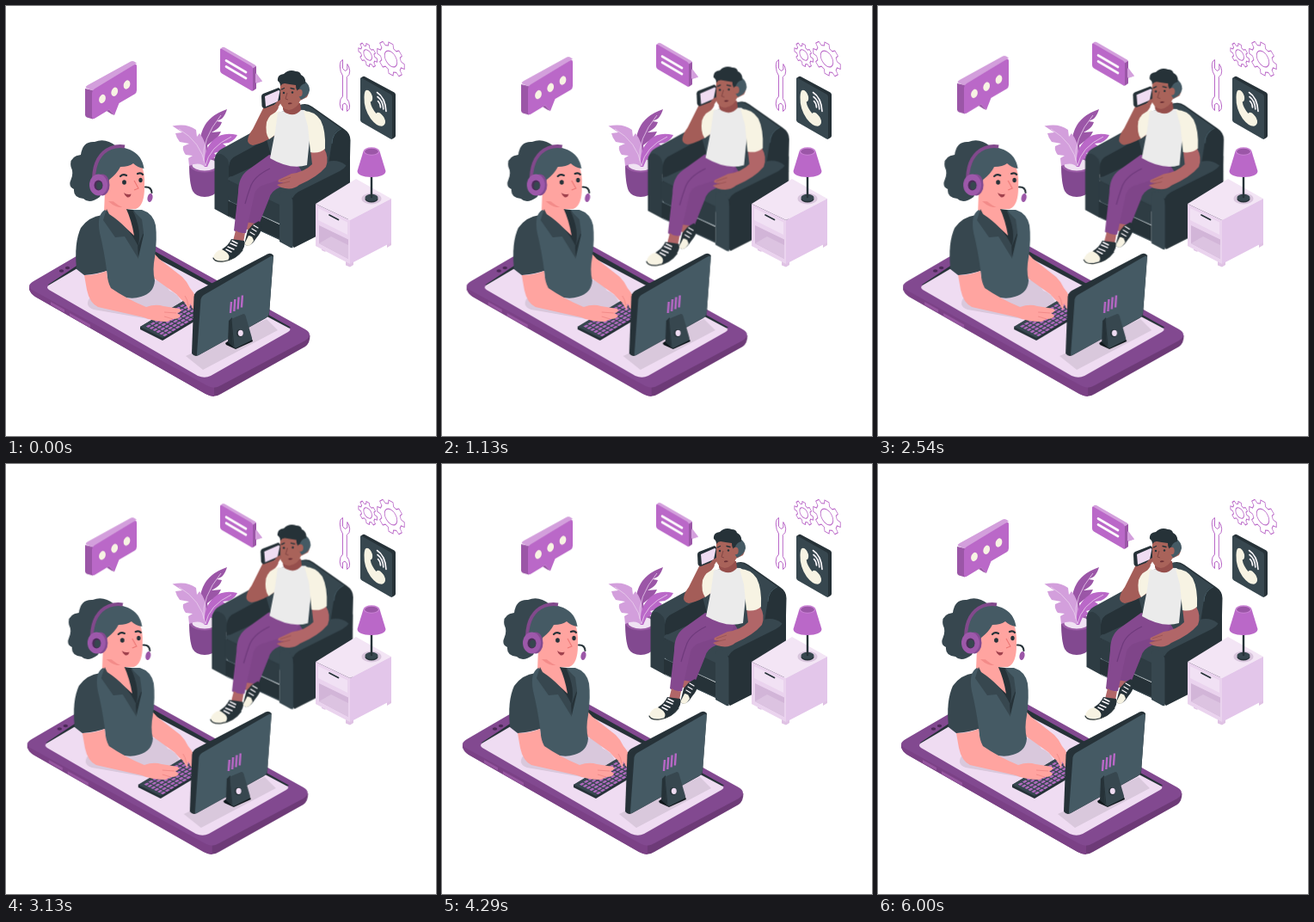
These frames come from a looping animation (500x500 px, 6040 ms). An HTML page:

```html
<!DOCTYPE html>
<html lang="en">
<head>
<meta charset="utf-8">
<title>Customer support</title>
<style>
html, body { margin: 0; width: 100%; height: 100%; overflow: hidden; background: #fff; }
svg { display: block; width: 100vw; height: 100vh; }
.float { animation: float 1.5s linear infinite; }
.shake { animation: shake 6s linear infinite; }
.beat { animation: beat 1s linear infinite; transform-origin: 321.5px 186.5px; }
@keyframes float { 50% { transform: translateY(-10px); } }
@keyframes shake {
  10%, 90% { transform: translateX(-1px); }
  20%, 80% { transform: translateX(2px); }
  30%, 50%, 70% { transform: translateX(-4px); }
  40%, 60% { transform: translateX(4px); }
}
@keyframes beat {
  0%, 15%, 40%, 55%, 100% { transform: scale(1); }
  10%, 50% { transform: scale(1.1); }
}
.p { fill: #ba68c8; } .pl { fill: #d39fdc; } .pd { fill: #824990; } .pm { fill: #9b56a7; }
.k { fill: #263238; } .d { fill: #37474f; } .g { fill: #455a64; } .kd { fill: #2e3c43; }
.s { fill: #ffa4a0; } .b { fill: #b16668; } .c { fill: #f7f3e3; }
.line { fill: none; stroke: #ba68c8; stroke-width: 1; stroke-linejoin: round; }
.ink { fill: none; stroke: #263238; stroke-linecap: round; }
.cream { fill: none; stroke: #fcf8fc; stroke-linecap: round; }
</style>
</head>
<body>
<svg viewBox="0 0 500 500">
  <!-- gears and wrench -->
  <g class="line">
    <path id="gearS" transform="matrix(.866 .5 0 1 420.700 57)"/>
    <path id="gearL" transform="matrix(.866 .5 0 1 447.500 61.500)"/>
    <path d="M391.500 81 V105 Q388 108 388.200 114 Q388.500 119 391.500 121.500 V114.500 L394 113 L396.500 116 V122.500 Q400 121 399.600 116 Q399.300 111 396.300 107.500 V82.500 Q400 80.500 399.700 75.500 Q399.300 70.500 396.800 67.500 V74 L394.200 75.500 L391.500 72.500 V62.500 Q388.200 64 388.300 70 Q388.500 77 391.500 81Z"/>
  </g>

  <!-- call sign -->
  <path class="k" d="M412 84 L415 82 Q416.500 81.500 418 82.500 L451.500 100.500 Q453 101.500 453 103 V151 Q453 152.500 451.500 153.200 L448.500 155Z"/>
  <path class="d" d="M412 85 Q412 83 414 84 L447 102.500 Q449 103.700 449 105.500 V153.500 Q449 155.500 447 154.400 L414 135.500 Q412 134.300 412 132.500Z"/>
  <path class="c" d="M418 98.500 Q420.500 96.500 423.500 100 Q426.800 104.500 426 109 Q425.500 111 423.700 111.500 Q424.500 118 430.500 125 Q432 122.800 435 124.500 Q439.500 128 441 133.500 Q441.500 138.500 437 139.800 Q431 140 424 131 Q416 119.500 416.500 106 Q416.600 100.500 418 98.500Z"/>
  <g class="cream" stroke-width="1.600"><path d="M432.500 110.500 Q435.500 113.500 435.500 118"/><path d="M432 105.500 Q438.300 110 438.800 120"/><path d="M431.500 100.500 Q441 106.500 442 122.500"/></g>

  <!-- plant -->
  <path class="pd" d="M213 183 Q213 206 217 215 Q221 222 231 222 Q241 222 246 215 Q250 204 249 183Z"/>
  <ellipse cx="231" cy="184" rx="18" ry="9.500" fill="#9b5ca6"/>
  <ellipse cx="231" cy="184.500" rx="14.500" ry="7" fill="#f0e2f3"/>
  <path class="pm" d="M229 184 Q221 162 229 143 Q236 127 257 120 Q255 127 251 131 L245 134 L251 135 Q249 141 244 144 L239 147 L250 146 Q246 155 239 158 L234 162 Q237 172 232 184Z"/>
  <path class="pl" d="M231 187 Q227 182 218 184 L213 186 L212 177 L217 174 L209 173 Q205 168 206 163 L213 160 L202 158 Q198 153 197 148 L205 147 L193.500 139.500 Q211 136 221 144 L222 152 L225 148 Q233 158 233 170 L234 187Z"/>
  <path class="p" d="M231 187 Q229 167 242 155 Q252 146 269 150 Q266 156 259 159 L252 160 L256 163 Q251 169 246 170 L242 171 L245 174 Q240 178 238 178 L234 187Z"/>
  <path d="M230 180 Q227 155 250 127 M232 186 Q227 158 201 143 M232 186 Q236 164 262 152" fill="none" stroke="#ead0ee" stroke-width=".8"/>

  <!-- armchair and caller -->
  <g class="beat">
    <path class="k" d="M310 140 L343 115 Q349 112 356 117 L393 143 Q400.500 148 400.500 156 L399 215 L330 240Z"/>
    <path class="d" d="M306 142 L318 124 L340 115 Q347 113 354 117.500 L389 142 Q380 147 379 158 L374 190 L320 212 L285 200Z"/>
    <path d="M379 160 Q379 148 390 142.500" fill="none" stroke="#455a64" stroke-width="1"/>
    <path class="d" d="M242.500 180 Q243 170 251 166 L293 143 Q302 142 306 148 L308 178 L262 198Z"/>
    <path class="kd" d="M242.500 180 Q243 171 250 172 Q260 176 259 187 V245 L242.500 236Z"/>
    <path class="k" d="M259 187 Q260 177 268 174 L303 155 L310 180 L259 212Z"/>
    <path class="kd" d="M257 205 L305 180 L338 196 L318 238 L262 211Z"/>
    <path class="d" d="M258 202 Q258 198 263 198 L300 181 L330 196 L318 231Z"/>
    <path class="kd" d="M258 203 L318 232 V253 L262 228 Q258 226 258 221Z"/>
    <path class="k" d="M258 226 L318 254 V272 L258 244Z"/>
    <path d="M259 245 L318 271 M258 226 L318 253" stroke="#455a64" stroke-width=".6"/>
    <path class="d" d="M318 220 Q319 212 327 207 L374 181 Q386 178 395 185 L400 192 L338 224Z"/>
    <path class="k" d="M332 230 Q332 221 340 216 L388 192 Q399 186 400 174 V244 Q399 248 394 251 L335 281 L329 275Z"/>
    <path class="d" d="M318 222 Q319 214 325 215 Q334 219 333.500 231 V281 Q332 282 329 280 L318 274Z"/>
    <!-- legs -->
    <path d="M340 186 L347 197 Q333 207 318 211 Q308 215 306 224 L294 254 L277 252 L286 215 Q289 201 307 193Z" fill="#7f4589"/>
    <path class="b" d="M278 251 l12 2 l-4 9 l-8 -3z"/>
    <path class="k" d="M277 277 L281 261 L287 254 L294 250 Q297 253 297 258 Q297 263 291 270 Q286 278 281 279Z"/>
    <path class="c" d="M277 277 L282 267 Q287 267 288 273 Q284 279 281 279Z"/>
    <path class="cream" d="M286 259 l5 3 M284 263 l5 3 M288 255 l5 3" stroke-width="1.200"/>
    <path d="M306 173 L339 186 Q341 193 331 198 L297 209 Q289 213 288 223 L279 264 Q271 266 265 261 L270 217 Q270 199 281 191Z" fill="#85498f"/>
    <path d="M307 189 Q288 198 284 211 Q281 219 278 230" fill="none" stroke="#6f3a7c" stroke-width="1.200"/>
    <path class="b" d="M267 261 Q272 265 278 264 L276 275 L264 273Z"/>
    <path class="c" d="M241 292 Q243 285 251 283 L276 282 Q269 295 254 298 Q244 299 241 295Z"/>
    <path class="k" d="M251 283 Q259 278 262 271 Q269 272 277 273 Q279 280 273 286 Q267 294 258 295.500 Q263 289 251 283Z"/>
    <path class="ink" d="M241 293 Q243 298 253 297 Q267 295 275 284" stroke-width="1.200"/>
    <path class="cream" d="M258 280 l7 3 M261 276 l7 3 M256 283 l6 3 M263 273 l6 3" stroke-width="1.500"/>
    <!-- upper body -->
    <path d="M281 157 Q281 151 287 143 L299 119 Q302 111 310 113 L317 118 Q314 125 307 128 L303 144 L316 136 L315 149 Q299 160 287 162 Q282 161 281 157Z" fill="#a45d58"/>
    <path class="c" d="M303 135 Q306 125 318 122 L322 143 L306 155 Q301 148 303 135Z"/>
    <path fill="#ebebeb" d="M316 124 Q328 120 347 121 Q354 124 355 139 L352 165 L350 185 Q331 191 307 177 L313 146Z"/>
    <path d="M322 113 H342 L343 121 Q336 129 327 125 Q323 124 322 120Z" fill="#964f4c"/>
    <path class="b" d="M354 167 L370 166 Q376 176 372 187 Q362 199 341 208 Q333 215 320 211 L315 208 L324 205 Q314 206 317 202 L332 195 Q347 193 356 184Z"/>
    <path d="M318 207 L330 204 M319 203 L331 199" stroke="#964f50" stroke-width=".7"/>
    <path class="c" d="M346 122 Q359 122 366 133 Q372 145 371 166 Q364 172 354 170 L351 140Z"/>
    <!-- head -->
    <path d="M319 92 Q321 87 333 87 L350 92 Q354 99 350 106 L342 110 Q339 119 329 121 Q320 120 318 110Z" fill="#a9635a"/>
    <path class="g" d="M338 93 L347 87 Q353 91 353 98 Q352 105 343 109 Q339 104 338 93Z"/>
    <path class="k" d="M319 93 Q319 89 316 87 Q315 80 323 79 Q329 73 337 76 Q342 76 343 80 Q349 83 348 90 Q342 91 340 99 Q337 98 337 92 Q329 91 324 90 Q321 90 319 93Z"/>
    <ellipse cx="341.500" cy="101" rx="3.200" ry="4.200" fill="#a9635a"/>
    <circle class="k" cx="323" cy="101" r="1.200"/><circle class="k" cx="333" cy="100.500" r="1.200"/>
    <path class="ink" d="M320.500 97 l3 -1.500 M331 95.500 l4 1" stroke-width="1.300"/>
    <path d="M327 101 L325 108 L328 109" fill="none" stroke="#7e4342" stroke-width=".9"/>
    <path d="M328 113 Q330 111.500 333 113 Q331 115 328 114Z" fill="#6c3036"/>
    <path class="k" d="M297 105 Q297 103 299 102 L317 95 L319 97 V112 L301 119 Q298 119 297.500 116Z"/>
    <path fill="#efdcf2" d="M301 105 L317 98 Q319 98 318 101 L316 111 L302 117Z"/>
    <path d="M311 119 Q313 111 319 109 L320 112 L315 120Z" fill="#a45d58"/>
  </g>

  <!-- side table and lamp -->
  <path fill="#dfc2e4" d="M367 280 h4.500 v6 l-4.500 -2z M395 296 h5 v7.500 l-5 -2z M443 275 h5 v3 l-5 3z M400 298 l4 -2 v5 l-4 2.500z"/>
  <path fill="#f3e5f5" d="M360 230 L407 201 L448 224 L400 249Z"/>
  <path fill="#ead3ee" d="M360 230 L400 249 V300 L360 279Z"/>
  <path fill="#e3c6ea" d="M400 249 L448 224 V275 L400 300Z"/>
  <path fill="#f1e1f4" d="M363 235 L397 251.500 V266 L363 249Z"/>
  <path fill="#d2b5d8" d="M364 255 L398 271.500 V294 L364 276Z"/>
  <path fill="#dcc3e1" d="M364 276 L378 268 L398 278 V294Z"/>
  <path class="ink" d="M376 243 L386.500 248.500" stroke-width="1.700"/>
  <ellipse cx="425" cy="224" rx="11.500" ry="6.500" fill="#d9c6dd"/>
  <ellipse class="k" cx="425" cy="224.500" rx="7.500" ry="4"/>
  <ellipse class="d" cx="425" cy="222.800" rx="7.500" ry="4"/>
  <path class="ink" d="M425 195 V222" stroke-width="2.400"/>
  <path class="p" d="M415.500 169 L408.500 192 Q409 198.500 425 199 Q441 198.500 441.500 192 L434.500 169Z"/>
  <ellipse cx="425" cy="169" rx="9.500" ry="4.700" fill="#ca83d5"/>
  <ellipse class="pm" cx="425" cy="169.300" rx="7.800" ry="3.500"/>

  <!-- speech bubbles -->
  <g class="float">
    <path class="pm" d="M92 96 L101 98 V131.500 L94 129.500 Q92 128.500 92 126.500Z"/>
    <path class="pl" d="M92.500 95 Q93 93 95 92 L145 64.500 Q147 63.500 149 64.500 L152 66.500 L101 98.500Z"/>
    <path class="p" d="M100 101 Q100 98 103 96.300 L148.500 68.500 Q152 66.300 152 70 V98 Q152 101 149.500 102.500 L131.500 113 L126 127 L120 120.500 L103.500 130.500 Q100 132.500 100 129Z"/>
    <path class="pm" d="M117 122 L120 120.500 L126 127 L122.500 125.500Z"/>
    <g class="c"><ellipse cx="112" cy="108" rx="3.700" ry="5.300" transform="rotate(18 112 108)"/><ellipse cx="126.200" cy="99.800" rx="3.700" ry="5.300" transform="rotate(18 126.200 99.800)"/><ellipse cx="140.500" cy="91.500" rx="3.700" ry="5.300" transform="rotate(18 140.500 91.500)"/></g>
  </g>
  <g class="float">
    <path class="pl" d="M249 50 L251.500 48 Q253 47.500 254.500 48.300 L290 68.700 Q291 69.500 291 71 V78 L298 87.500 L291 90 V96 L286 99Z"/>
    <path class="pm" d="M286 73 L291 70 V96 L287.500 98.500 L286 98Z"/>
    <path class="pl" d="M290 78 L298 87.500 L290 89.500Z"/>
    <path class="p" d="M249 51 Q249 49 251 50 L285 69.700 Q287 71 287 73 V97 Q287 99.500 285 98.300 L251 78.500 Q249 77.300 249 75Z"/>
    <g class="cream" stroke-width="2.700"><path d="M256 63.500 L279 77"/><path d="M256 70.500 L279 84"/></g>
  </g>

  <!-- operator on the phone -->
  <g class="shake">
    <path fill="#6d3a77" d="M27 326 V329 Q28 334 34 338 L232 451 Q242 456.500 250 451 L348 396 Q353.500 392 353.500 383Z"/>
    <path fill="#7b4186" d="M27 326 V329 Q28 334 34 338 L232 451 Q238 454 242 454 V441Z"/>
    <path class="pd" d="M32 320 L128 264 Q137 260 146 264 L348 376 Q358 382 348 389 L250 441 Q242 446 234 441.500 L32 331 Q22 326 32 320Z"/>
    <path d="M52 344 l16 9 v3.500 l-16 -9z M74 357 l24 13.500 v3.500 l-24 -13.500z" fill="#95559f"/>
    <path class="k" d="M49 324 L132 269 Q138 266 144 269 L331 373.500 L322 379 L140 281 L52 328Z"/>
    <path fill="#efdcf2" d="M50 324.500 L132 276 Q137 273 142 275.500 L328 374 Q333 376 328 379 L238 430 Q231 433.500 223 430 L50 330 Q46 327 50 324.500Z"/>
    <path class="k" d="M84 294 l8 -4.500 q3 0 3 3 l-8 5 q-4 -.5 -3 -3.500z"/>
    <ellipse cx="64.500" cy="308" rx="2.700" ry="1.700" fill="#4c2a58"/><ellipse cx="71.500" cy="304.500" rx="2.700" ry="1.700" fill="#4c2a58"/>
    <!-- shadows -->
    <path fill="#d9c8dc" d="M97 340 Q91 349 102 353 L166 364 L205 348 Q201 334 190 331 Q186 323 178 318 L120 328Z"/>
    <path fill="#d9c8dc" d="M209 407 L229 423 L316 377 L303 364Z"/>
    <!-- keyboard -->
    <path class="k" d="M156 373 L228 330 L252 343 V347 L182 389 L156 376Z"/>
    <path class="d" d="M156 373 L228 330 L252 343 L182 386Z"/>
    <g stroke="#b06abf" stroke-width="2.900" stroke-dasharray="4.300 1.400" transform="matrix(.86 -.52 .86 .46 158 373)">
      <path d="M3 4 H78 M3 8.500 H78 M3 13 H78 M3 17.500 H78 M3 22 H78 M3 26.300 H78"/>
    </g>
    <!-- right arm -->
    <path class="s" d="M167 282 L178 294 L205 315 Q211 321 214 328 Q222 337 221 346 L218 353 L214 346 L213 354 L208 345 Q203 341 198 335 L170 315Z"/>
    <path d="M208 337 Q211 341 212 348" fill="none" stroke="#ee8583" stroke-width=".8"/>
    <!-- hair bun -->
    <path class="d" d="M128 163 Q116 153 103 158 Q89 157 87 173 Q73 175 75.500 187 Q79 194 75.500 202 Q72 210 79 213 Q78 223 90 224 Q97 231 109 222 L122 195Z"/>
    <!-- neck and jacket -->
    <path class="s" d="M115 215 L140 224 Q138 234 145 243 Q153 255 155 270 L135 262 L114 240Z"/>
    <path d="M119 227 Q127 235 139 235 L139 228Z" fill="#f38b89"/>
    <path class="d" d="M112 243 Q96 245 87 258 Q79 275 82 306 L91 313 Q106 312 120 307 L126 270Z"/>
    <path class="g" d="M115 237 Q105 243 109 264 Q114 284 117 307 L119 329 Q139 344 157 338 Q172 334 173 319 Q170 307 173 292 Q176 271 174 255 Q171 241 158 237 L147 237 L152 262 L126 247Z"/>
    <path class="k" d="M139 236 L148 237 Q157 251 160 266 L154 292 Q147 272 137 250Z"/>
    <path class="s" d="M117 234 L139 234 Q146 249 149 267 Q135 253 117 242Z"/>
    <path class="d" d="M117 236 L113 249 L127 269 L138 268 L154 294 L153 278 Q143 257 120 242Z"/>
    <path class="d" d="M147 237 L158 248 L160 263 L153 281 Q159 262 147 237Z"/>
    <!-- left arm -->
    <path class="s" d="M91 313 Q106 313 117 308 Q118 321 122 328 Q141 341 163 350 Q174 346 183 349 L202 352 Q206 355 199 357 L203 360 Q202 364 194 364 L188 367 Q171 367 160 362 L107 350 Q97 345 94 330Z"/>
    <path d="M184 356 L198 357 M184 361 L194 364" stroke="#ee8583" stroke-width=".8"/>
    <!-- head -->
    <path class="s" d="M117 187 L156 181 Q162 193 161 211 Q161 232 151 236 Q138 238 127 229 Q117 221 114 207Z"/>
    <path class="g" d="M104 200 Q101 176 117 167 Q130 161 144 167 Q158 173 160.500 189 Q153 188 148 183 Q143 187 133 187 Q129 195 120 202 L117 216 Q106 215 104 200Z"/>
    <path d="M102 200 Q103 173 122 165 Q130 162 138 163.500" fill="none" stroke="#82498c" stroke-width="4"/>
    <ellipse class="pd" cx="112" cy="208" rx="8.500" ry="12.500"/>
    <ellipse cx="107.500" cy="208" rx="10.500" ry="12.500" fill="#9d58aa"/>
    <ellipse cx="107.500" cy="208.500" rx="5" ry="6" fill="#4a2d58"/>
    <ellipse class="d" cx="108.500" cy="209" rx="3.500" ry="4.600"/>
    <ellipse class="k" cx="137.500" cy="205" rx="2.400" ry="2.800"/><ellipse class="k" cx="156.500" cy="202.500" rx="2.200" ry="2.800"/>
    <path class="ink" d="M133 198 Q136 195 140 197 M153 195 Q157 193.500 159 196" stroke-width="2.200"/>
    <path d="M149 203 L154 212 L149 214" fill="none" stroke="#ec7674" stroke-width="1.100"/>
    <path d="M137 217 Q140 220 145.500 218.500 Q145 223 141 222.500 Q138 221 137 217Z" fill="#a0414d"/>
    <path class="ink" d="M162 210.500 Q169 210 169.500 217" stroke-width="2"/>
    <ellipse class="pm" cx="167.500" cy="223" rx="3" ry="5" transform="rotate(12 167.500 223)"/>
    <!-- monitor -->
    <path class="k" d="M218.500 338 Q219 334 223 331 L304 288.500 Q308 286.500 311 290 L306 358 Q305 361 302 363 L224 406 Q219 408.500 216 404Z"/>
    <path class="g" d="M226.500 341 Q227 338 230 336 L307 291.500 Q311 289.500 310.700 293 L306 357 Q305.500 360 303 362 L224 406 Q221.500 407 222 404Z"/>
    <path d="M262 344 l-1 13 M266.300 341 l-1 14 M270.600 338.500 l-1 14 M274.900 336.500 l-1 14" stroke="#ba68c8" stroke-width="2.400"/>
    <path d="M255 392 L262 387 L286 387 L287 390 L267 399 L256 394Z" fill="#10181c"/>
    <path class="k" d="M259 366 L263 362 L266 398 L258 391Z"/>
    <path class="d" d="M262 366 Q262 364 264 363 L276 358 Q278 358 278.500 360 L286 386 Q286.500 388 285 389 L267 398 L264 396Z"/>
    <path class="ink" d="M262 365 L265 397" stroke-width="1"/>
    <ellipse class="k" cx="272" cy="380.500" rx="4" ry="4.600"/>
    <ellipse cx="272.800" cy="380.300" rx="3" ry="3.600" fill="#efdcf2"/>
  </g>
</svg>
<script>
const LOOP = 6040, HOLD = 6000;

// Outline of a cog with a round hole in the middle.
function gear(id, outer, inner, hole, teeth) {
  const step = 2 * Math.PI / teeth;
  const points = [];
  for (let i = 0; i < teeth; i++) {
    [[-.32, inner], [-.2, outer], [.2, outer], [.32, inner]].forEach(([turn, r]) => {
      const a = (i + turn) * step;
      points.push((r * Math.cos(a)).toFixed(2) + " " + (r * Math.sin(a)).toFixed(2));
    });
  }
  const ring = `M${hole} 0A${hole} ${hole} 0 1 1 ${-hole} 0A${hole} ${hole} 0 1 1 ${hole} 0Z`;
  document.getElementById(id).setAttribute("d", "M" + points.join("L") + "Z" + ring);
}
gear("gearS", 12.6, 9.6, 5.6, 8);
gear("gearL", 18.4, 14.2, 8.4, 8);

// Keep the three rhythms in step with the overall loop.
const motions = document.getAnimations();
motions.forEach(m => m.pause());
let start;
function tick(now) {
  start ??= now;
  const t = Math.min((now - start) % LOOP, HOLD);
  motions.forEach(m => { m.currentTime = t; });
  requestAnimationFrame(tick);
}
requestAnimationFrame(tick);
</script>
</body>
</html>
```
